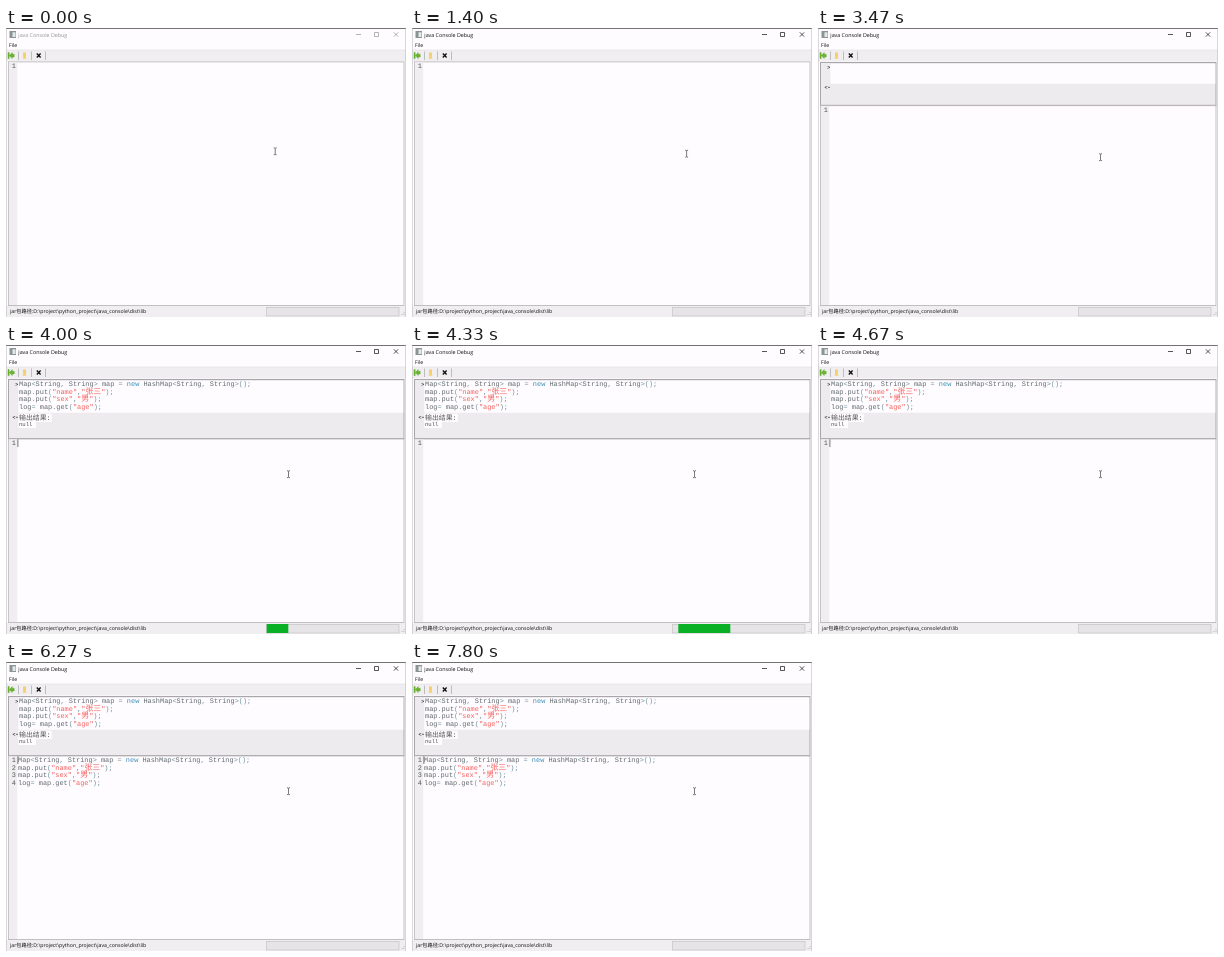
Animation, 400 px wide and 289 px high, one loop 8 s. Source, as an HTML page:

```html
<!DOCTYPE html>
<html lang="en">
<head>
<meta charset="utf-8">
<title>Console</title>
<style>
  html, body { margin: 0; width: 100%; height: 100%; overflow: hidden; background: #fefcfe; }
  svg { display: block; width: 100%; height: 100%; }
  text { white-space: pre; text-rendering: geometricPrecision; }
  .ui { font: 5.19px "Open Sans", "Noto Sans CJK SC", "Noto Sans CJK", sans-serif; fill: #111; }
  .code { font: 6.91px "Liberation Mono", "Noto Sans CJK SC", "Noto Sans CJK", monospace; fill: #626a6e; }
  .code .op { fill: #6d909c; }
  .code .kw { fill: #3b8fb8; }
  .code .str { fill: #f6605d; }
  .cjk { font-size: 7.9px; font-weight: 300; }
  .code.num { fill: #555; }
  .mark { font: bold 5px "Liberation Mono", monospace; fill: #333; }
  .sep { stroke: #a8a8a8; stroke-width: .7; }
</style>
</head>
<body>
<svg viewBox="0 0 400 289" preserveAspectRatio="none">
  <rect width="400" height="289" fill="#fefcfe"/>

  <!-- Title bar -->
  <rect x="3.5" y="3" width="6.5" height="7" fill="#8a9494"/>
  <rect x="6.5" y="4.3" width="3" height="4.7" fill="#e3e8e8"/>
  <g id="title">
    <text class="ui" x="12.3" y="8.7" style="font-size:5.33px;fill:currentColor">java Console Debug</text>
    <path d="M350 6.5h5M368.5 4.5h4v4h-4zM387.8 4.3l4.4 4.4m0-4.4l-4.4 4.4" fill="none" stroke="currentColor" stroke-width=".7"/>
  </g>
  <text class="ui" x="3" y="18.8">File</text>

  <!-- Toolbar -->
  <rect y="22" width="400" height="11.5" fill="#f0eef0"/>
  <path d="M0 22h400" stroke="#dedede" stroke-width=".6"/>
  <path d="M2 24.6h1.2v6H2zM3.4 27.6l2.8-3v1.6h2v2.8h-2v1.6z" fill="#69b52c" stroke="#5a9e2c" stroke-width=".4"/>
  <path d="M17 24.5h3v3.6l-.6 1.2h.8v1.4h-3.4v-1.4h.8l-.6-1.2z" fill="#f5cf69"/>
  <path d="M30.8 25.6l3.8 3.8m0-3.8l-3.8 3.8" stroke="#111" stroke-width="1.4"/>
  <path class="sep" d="M12.5 23.5v8.5M25.5 23.5v8.5M39.5 23.5v8.5"/>

  <!-- Console history -->
  <g id="history">
    <rect id="panel" x="2.5" y="34.5" width="395.5" fill="#eeebee" stroke="#a8a6a8"/>
    <rect id="entry" x="12.3" y="36" width="385" fill="#fefcfe"/>
    <text class="mark" x="9.3" y="41">&gt;</text>
    <text class="mark" id="reply" x="6.6">&lt;•</text>
    <g id="result">
      <text class="code" id="historyCode"></text>
      <path d="M12.3 68.8h33.5v8.2H30v6H12.3z" fill="#fefcfe"/>
      <text class="code num" x="13" y="74.9"><tspan class="cjk" style="font-size:6.9px">输出结果</tspan>:</text>
      <text class="code num" x="13" y="81" style="font-size:5.6px">null</text>
    </g>
  </g>

  <!-- Editor; its origin is the top of the first line -->
  <g id="editor">
    <rect x="2.5" y="-.3" width="395.5" height="300" fill="#fefcfe" stroke="#b4b2b4" stroke-width=".8"/>
    <rect x="2.9" y=".2" width="8.3" height="300" fill="#f0eef0"/>
    <text class="code num" id="numbers"></text>
    <text class="code" id="source"></text>
    <rect id="caret" width=".8" height="7.7" fill="#555"/>
  </g>

  <!-- Status bar -->
  <rect y="277.6" width="400" height="12" fill="#f0eef0"/>
  <path d="M2 277.5h396" stroke="#b4b2b4" stroke-width=".8"/>
  <text class="ui" x="4" y="285.2">jar包路径:D:\project\python_project\java_console\dist\lib</text>
  <rect x="260.5" y="279.5" width="132.5" height="8.5" fill="#e6e4e6" stroke="#c6c4c6" stroke-width=".7"/>
  <rect id="chunk" y="279" height="9" fill="#09b025"/>
  <path d="M398 284v.8m0 1.2v.8m-2 0v-.8" stroke="#999" stroke-width=".8"/>

  <!-- Window frame -->
  <path d="M0 .4h400" stroke="#3a3a3a" stroke-width=".8"/>
  <path d="M.3 0v289M399.7 0v289" stroke="#b4b2b4" stroke-width=".6"/>
  <path id="pointer" d="M-1.5-3.4h1.1l.4.4.4-.4h1.1M0-3v6M-1.5 3.4h1.1l.4-.4.4.4h1.1" fill="none" stroke="#444" stroke-width=".7"/>
</svg>

<script>
const LOOP = 8000, STEP = 1000 / 15, LINE = 7.5;
const $ = id => document.getElementById(id);
const set = (id, attrs) => {
  for (const name in attrs) $(id).setAttribute(name, attrs[name]);
};
const show = (id, on) => $(id).style.display = on ? '' : 'none';

const lines = [
  'Map<String, String> map = new HashMap<String, String>();',
  'map.put("name","张三");',
  'map.put("sex","男");',
  'log= map.get("age");'
];
const escape = s => s.replace(/</g, '&lt;').replace(/>/g, '&gt;');
const span = (kind, s) => `<tspan class="${kind}">${s}</tspan>`;

function highlight(line) {
  return line.replace(/"[^"]*"|\bnew\b|[<>=(),.;]+/g, token => {
    if (token[0] === '"')
      return span('str', token.replace(/[\u4e00-\u9fff]+/g, s => span('cjk', s)));
    return span(token === 'new' ? 'kw' : 'op', escape(token));
  });
}
const rows = (list, x, y) => list.map((s, i) =>
  `<tspan x="${x}" y="${y + i * LINE}">${s}</tspan>`).join('');

const code = lines.map(highlight);
$('historyCode').innerHTML = rows(code, 13, 41.3);
$('source').innerHTML = rows(code, 12, 6.1);

// Start time, line (-1 = hidden), at end of line
const carets = [
  [0, -1], [1600, 0], [2000, 3, 1], [2530, -1], [3070, 3, 1],
  [3470, -1], [3670, 0], [4065, -1], [4530, 0], [4870, 2],
  [5400, -1], [5870, 2], [6130, 1], [6270, 0], [6600, -1],
  [6730, 3, 1], [7270, -1], [7330, 2], [7600, 1], [7800, 0]
];

let lineCount;
function setLineCount(count) {
  if (count === lineCount) return;
  lineCount = count;
  $('numbers').innerHTML = rows([1, 2, 3, 4].slice(0, count), 5.8, 6.2);
}

function draw(t) {
  const running = t >= 3470, done = t >= 3670;
  const filled = t >= 2000 && t < 3470 || t >= 4870;
  const top = done ? 94.3 : running ? 78 : 34.2;

  $('title').style.color = t < 1330 ? '#969696' : '#111';
  const p = Math.min(1, Math.max(0, (t - 1265) / 335));
  set('pointer', { transform: `translate(${269.2 + 13.3 * p} ${123.3 + 5.9 * p})` });

  show('history', running);
  show('result', done);
  set('panel', { height: top - 35.2 });
  set('entry', { height: done ? 31.7 : 19.8 });
  set('reply', { y: done ? 74.4 : 61.4 });

  set('editor', { transform: `translate(0 ${top})` });
  show('source', filled);
  setLineCount(filled ? 4 : 1);

  const [, line, atEnd] = carets.findLast(c => c[0] <= t);
  show('caret', line >= 0);
  set('caret', { x: atEnd ? 94.2 : 11.5, y: Math.max(0, line) * LINE });

  // Busy block slides in from the left edge of the bar
  const tick = Math.floor(Math.min(t, 4535) / STEP + .05) * STEP;
  const right = Math.max(0, (tick - 3800) * .108);
  const left = Math.max(0, right - 52);
  show('chunk', t < 4665 && right > 0);
  set('chunk', { x: 260.7 + left, width: right - left });
}

function frame() {
  draw(performance.now() % LOOP);
  requestAnimationFrame(frame);
}
frame();
</script>
</body>
</html>
```
